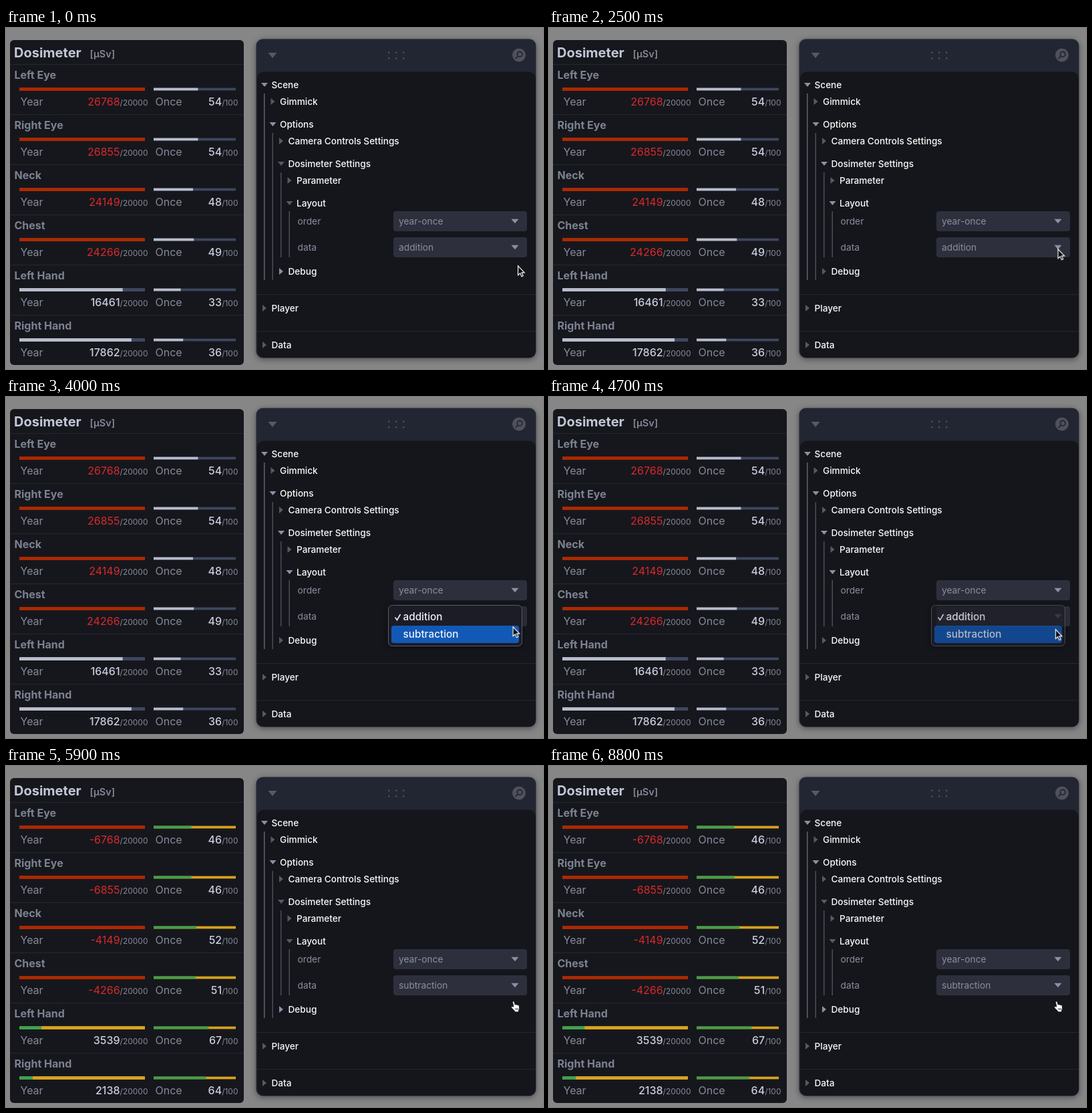
An HTML page that plays this animation: 804 px wide and 510 px high, repeating every 8.9 s.

```html
<!DOCTYPE html>
<html lang="en">
<head>
<meta charset="utf-8">
<title>Dosimeter settings</title>
<style>
html, body { margin: 0; width: 100%; height: 100%; overflow: hidden; background: #868686; }
svg { display: block; width: 804px; height: 510px; font: 400 13.75px Inter, "Liberation Sans", sans-serif; }

.heading { font-weight: 700; font-size: 20px; fill: #c3c7d6; }
.unit { font-weight: 600; font-size: 14.5px; fill: #838896; }
.name { font-weight: 700; font-size: 16px; fill: #7c8291; }
.label { font-size: 16px; fill: #858a99; }
.value { font-size: 16px; text-anchor: end; }
.num { font-weight: 500; fill: #c9cddc; }
.over { font-weight: 400; fill: #d9292a; }
.max { font-size: 12px; fill: #858a99; }
.folder { font-weight: 500; font-size: 13.6px; fill: #fafafa; }
.field { fill: #8a8e9e; }
.option { font-size: 15.3px; font-weight: 500; fill: #eef0f4; }
.dim { fill: #565a66; }
.lit { fill: #8c90a3; }

.add, .sub, .inner, .debug, .menu, .ghost, .arrow, .hand { animation: 8.9s infinite; }
.add { animation-name: before; animation-timing-function: step-end; }
.sub, .hand { animation-name: after; animation-timing-function: step-end; }
.arrow { animation-name: before, move; animation-timing-function: step-end, ease-in-out; }
.inner { animation-name: inner; animation-timing-function: step-end; }
.debug { animation-name: debug; animation-timing-function: step-end; }
.menu { animation-name: menu; animation-timing-function: linear; }
.ghost { animation-name: ghost; animation-timing-function: step-end; }

@keyframes before { 0% { visibility: visible } 56.18%, 100% { visibility: hidden } }
@keyframes after { 0% { visibility: hidden } 56.18%, 100% { visibility: visible } }
@keyframes inner { 0% { fill: #565a66 } 23% { fill: #8c90a3 } 56.18%, 100% { fill: #565a66 } }
@keyframes debug { 0% { fill: #8c90a3 } 23% { fill: #565a66 } 56.18%, 100% { fill: #8c90a3 } }
@keyframes menu {
  0%, 40.44% { opacity: 0 }
  40.45%, 52.25% { opacity: 1 }
  54.49%, 100% { opacity: 0 }
}
@keyframes ghost { 0% { opacity: 0 } 54.49% { opacity: .6 } 55.9%, 100% { opacity: 0 } }
@keyframes move {
  0%, 21.35% { transform: translate(766px, 355px) }
  26.97%, 40.45% { transform: translate(761.5px, 330px) }
  44.38%, 50.56% { transform: translate(758.5px, 343px) }
  54.49%, 100% { transform: translate(757.5px, 349px) }
}
</style>
</head>
<body>
<svg id="stage" viewBox="0 0 804 510" xmlns="http://www.w3.org/2000/svg">
  <defs>
    <filter id="shadow" x="-10%" y="-10%" width="120%" height="120%">
      <feDropShadow dx="0" dy="2" stdDeviation="5" flood-color="#000" flood-opacity=".45"/>
    </filter>
  </defs>
  <g id="meter"></g>
  <g id="panel"></g>
  <g class="ghost">
    <text class="option" x="595" y="360" style="fill:#08090d">subtraction</text>
    <text class="option" x="645" y="334" style="fill:#22252f">n</text>
  </g>
  <g class="menu">
    <rect x="572.5" y="311.5" width="200" height="61" rx="6" fill="#1d1f25" stroke="#585b62" filter="url(#shadow)"/>
    <rect x="577" y="342" width="191" height="26" rx="4" fill="#1259b7"/>
    <path d="M582.5 329.5l3 4 5-8.5" fill="none" stroke="#eef0f4" stroke-width="1.6"/>
    <text class="option" x="594.5" y="334">addition</text>
    <text class="option" x="594.5" y="360">subtraction</text>
  </g>
  <path class="arrow" d="M.6 .8V14.6L3.8 11.7 6 16.8 8.3 15.8 6.1 10.8H10.2Z" fill="#0b0b0d" stroke="#f4f4f4" stroke-width="1.2"/>
  <g class="hand">
    <g transform="translate(755 351)" stroke="#15161b">
      <path d="M5 9L3.6 2.6C3.3.8 5.6.3 6 2L7.2 6.2C7.6 5.2 9 5.2 9.4 6.4 10 5.7 11.2 5.9 11.5 7 12.2 6.5 13.2 7 13.3 8L13.6 11Q13.6 13 12.6 14.5V16.8H6.8V15.5L2 10.8C.8 9.4 2.4 8 3.6 9Z" fill="#fff" stroke-width=".8"/>
      <path d="M7.8 11v3M9.6 11v3M11.4 11v3" stroke-width=".7"/>
    </g>
  </g>
</svg>
<script>
const rect = (x, y, w, h, fill, rx = 0) =>
  `<rect x="${x}" y="${y}" width="${w}" height="${h}" rx="${rx}" fill="${fill}"/>`;
const text = (x, y, cls, str) => `<text x="${x}" y="${y}" class="${cls}">${str}</text>`;
const down = (x, y, cls, w = 5, h = 3) =>
  `<path class="${cls}" d="M${x - w} ${y - h}h${2 * w}l${-w} ${2 * h}z"/>`;
const right = (x, y, cls) => `<path class="${cls}" d="M${x - 3} ${y - 5}l6 5-6 5z"/>`;

// Dosimeter readout
const MAX_YEAR = 20000, MAX_ONCE = 100;
const parts = [
  ["Left Eye", 26768, 54], ["Right Eye", 26855, 54], ["Neck", 24149, 48],
  ["Chest", 24266, 49], ["Left Hand", 16461, 33], ["Right Hand", 17862, 36]
];

function gauge(x, y, w, h, value, max, over, colors) {
  const top = y - h / 2;
  if (over) return rect(x, top, w, h, "#ab2903");
  return rect(x, top, w, h, colors[1]) + rect(x, top, w * value / max, h, colors[0]);
}

function reading(x, y, value, max, over) {
  return `<text x="${x}" y="${y}" class="value"><tspan class="${over ? "over" : "num"}">${value}</tspan>` +
    `<tspan class="max">/${max}</tspan></text>`;
}

function readings(y, year, once, over, colors) {
  return gauge(20, y + 37, 188, 5, year, MAX_YEAR, over, colors) +
    gauge(221, y + 37, 123, 3.8, once, MAX_ONCE, false, colors) +
    reading(212.5, y + 61.5, year, MAX_YEAR, over) +
    reading(347.5, y + 61.5, once, MAX_ONCE, false);
}

function part([name, year, once], i) {
  const y = 54.5 + 75 * i, over = year > MAX_YEAR;
  return rect(6, y - .5, 350, 1, "#252831") +
    text(12.5, y + 21.5, "name", name) +
    text(21.5, y + 61.5, "label", "Year") + text(223.5, y + 61.5, "label", "Once") +
    `<g class="add">${readings(y, year, once, over, ["#b8bdcb", "#3e475f"])}</g>` +
    `<g class="sub">${readings(y, MAX_YEAR - year, MAX_ONCE - once, over, ["#41a04d", "#d8a21f"])}</g>`;
}

document.getElementById("meter").innerHTML =
  rect(6, 18, 350, 486, "#16171d", 6) +
  text(12, 44, "heading", "Dosimeter") + text(125.5, 44, "unit", "[μSv]") +
  parts.map(part).join("");

// Settings panel: [title, indent, centre y, arrow, class]
const folders = [
  ["Scene", 0, 85, down, "lit"], ["Gimmick", 1, 110, right, "dim"],
  ["Options", 1, 144, down, "lit"], ["Camera Controls Settings", 2, 169, right, "dim"],
  ["Dosimeter Settings", 2, 203, down, "inner"], ["Parameter", 3, 228, right, "dim"],
  ["Layout", 3, 262, down, "inner"], ["Debug", 2, 364, right, "debug"],
  ["Player", 0, 419, right, "dim"], ["Data", 0, 474, right, "dim"]
];
const guides = [[98, 377], [157, 377], [216, 343], [274, 343]];

const folder = ([title, indent, y, arrow, cls]) =>
  arrow(387 + 12.5 * indent, y, cls) + text(397.5 + 12.5 * indent, y + 5, "folder", title);

const guide = ([top, bottom], i) =>
  rect(386 + 12.5 * i, top, 1.5, bottom - top, i ? "#4a4d58" : "#60636d");

const select = (y, label, value) =>
  text(436.5, y + 5, "field", label) + rect(580, y - 15, 200, 30, "#2d303c", 4) +
  value + down(762, y, "lit", 5.5, 3.2);

const dots = [0, 1, 2, 3, 4, 5].map(i =>
  rect(572 + 11 * (i % 3), 35.5 + 8.5 * (i > 2), 2.5, 2.5, "#50535d", 1)).join("");

document.getElementById("panel").innerHTML =
  `<g filter="url(#shadow)">${rect(374.5, 16.5, 419, 477, "#242631", 10)}</g>` +
  rect(376, 65.5, 417, 427.5, "#15161c", 10) +
  `<g style="--c:#50535d">${down(399, 41, "dim", 6.5, 4)}</g>` + dots +
  `<circle cx="768" cy="40.5" r="10" fill="#4f525b"/>
   <g fill="none" stroke="#242631" stroke-width="1.8">
     <circle cx="769.2" cy="39.3" r="3.8"/><path d="M766.4 42.2l-3.6 3.6"/>
   </g>` +
  rect(376, 398, 417, 1, "#23262f") + rect(376, 453, 417, 1, "#23262f") +
  guides.map(guide).join("") + folders.map(folder).join("") +
  select(289, "order", text(588, 294, "field", "year-once")) +
  select(328, "data", text(588, 333, "field add", "addition") + text(588, 333, "field sub", "subtraction"));
</script>
</body>
</html>
```
